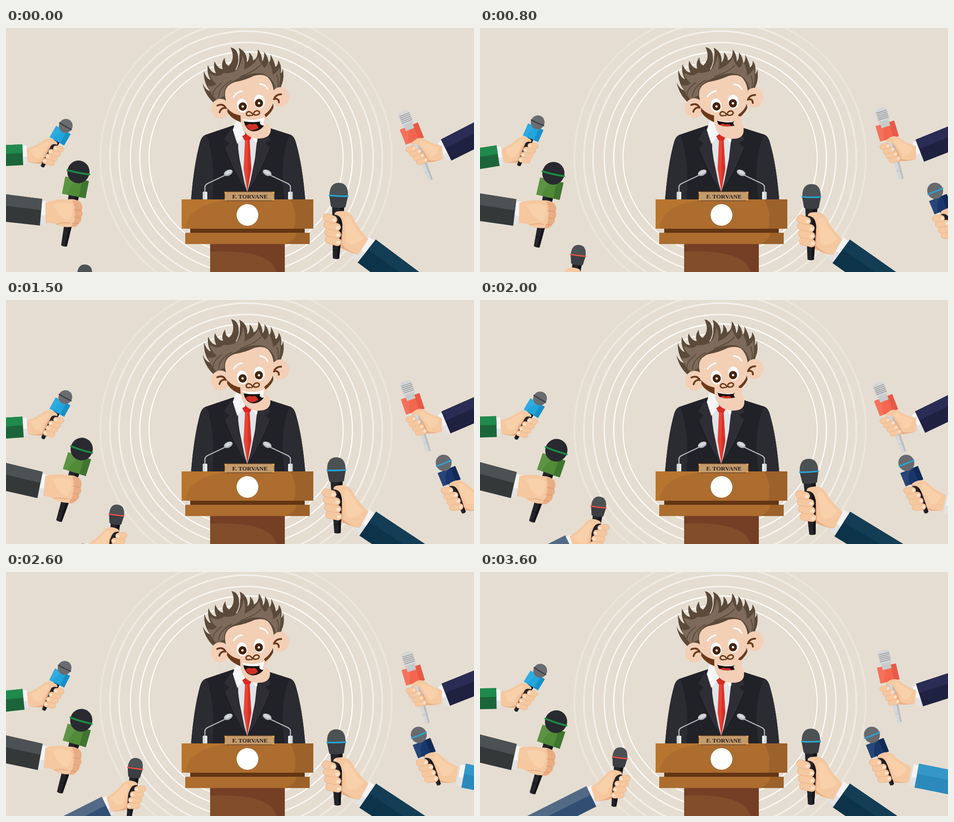
These frames come from a looping animation (1034x541 px, 3.8 s). An HTML page:

```html
<!DOCTYPE html>
<html lang="en">
<head>
<meta charset="utf-8">
<title>Press conference</title>
<style>
  html, body { margin: 0; width: 100%; height: 100%; overflow: hidden; background: #e5ddd1; }
  svg { display: block; width: 100vw; height: 100vh; }
</style>
</head>
<body>
<svg id="stage" viewBox="0 0 1034 541" preserveAspectRatio="none"></svg>
<script>
const path = (d, fill) => `<path d="${d}" fill="${fill}"/>`;
const line = (d, color, w) =>
  `<path d="${d}" fill="none" stroke="${color}" stroke-width="${w}" stroke-linecap="round" stroke-linejoin="round"/>`;
const poly = (pts, fill) => `<polygon points="${pts.join(' ')}" fill="${fill}"/>`;
const rect = (x, y, w, h, fill, r = 0) =>
  `<rect x="${x}" y="${y}" width="${w}" height="${h}" rx="${r}" fill="${fill}"/>`;
const oval = (x, y, rx, ry, fill) => `<ellipse cx="${x}" cy="${y}" rx="${rx}" ry="${ry}" fill="${fill}"/>`;
const group = (id, body) => `<g id="${id}">${body}</g>`;
const placed = (t, body) => `<g transform="${t}">${body}</g>`;

const SKIN = '#f5c8a0', SHADE = '#e9ad84', GLOW = '#f8d0aa';
const FACE = '#f3cfb6', BROWN = '#6b3a1a', DARK_HAIR = '#5b4a3a', HAIR = '#7d6a5a';

// ---------- backdrop ----------
function rings() {
  const spec = [[214.5, 2.2, 1], [235, 2.6, .95], [256, 3, .75], [281, 3.4, .6], [301, 3.8, .38], [322, 4.2, .22]];
  return spec.map(([r, w, o]) =>
    `<circle cx="530.5" cy="288" r="${r}" fill="none" stroke="#fff" stroke-width="${w}" opacity="${o}"/>`).join('');
}

// ---------- speaker ----------
function suit() {
  return path('M409 380 Q415 305 428 256 Q432 239 443 236 L502 216 L574 219 L627 236 Q637 239 641 256 Q655 305 661 380Z', '#212227')
    + path('M409 380 Q415 305 428 256 Q432 239 443 236 Q464 300 456 380Z', '#2b2b32')
    + path('M661 380 Q655 305 641 256 Q637 239 627 236 Q602 300 616 380Z', '#2b2b32')
    + poly([[512, 236], [556, 236], [554, 290], [533, 364], [514, 300]], '#e3e4e7')
    + path('M497 222 L482 248 L494 255 L483 266 Q500 315 531 364 L516 290 L511 254Z', '#2f2e35')
    + path('M571 222 L585 248 L572 255 L584 266 Q566 315 535 364 L550 290 L554 254Z', '#2f2e35')
    + line('M483 266 Q500 315 531 364 M584 266 Q566 315 535 364', '#19191d', 1.5)
    + poly([[508, 205], [501, 226], [511, 257], [529, 236], [520, 210]], '#f7f7f7')
    + poly([[538, 236], [553, 255], [558, 236]], '#f7f7f7')
    + poly([[528, 247], [538, 247], [542, 312], [533, 363], [525, 312]], '#e84436')
    + poly([[535, 247], [538, 247], [542, 312], [533, 363]], '#d4342c')
    + poly([[522, 240], [532, 233], [544, 239], [539, 249], [527, 249]], '#d92a22');
}

function hair() {
  return path('M466 172 Q440 152 434 122 Q441 138 451 140 Q436 122 437 95 Q443 113 452 115 '
      + 'Q443 100 446 82 Q453 100 464 100 Q457 86 461 74 Q468 91 479 91 Q474 79 483 66 '
      + 'Q484 81 492 84 Q508 68 496 43 Q514 46 513 70 Q519 58 514 44 Q534 54 532 76 '
      + 'Q539 70 537 54 Q546 62 546 72 Q558 66 556 47 Q566 58 566 74 Q572 66 570 53 '
      + 'Q580 64 580 78 Q586 72 584 58 Q594 76 595 86 Q602 82 601 71 Q610 82 607 100 '
      + 'Q612 97 611 87 Q616 110 609 126 Q605 142 595 153 L580 112 L490 160Z', DARK_HAIR)
    + path('M468 163 Q449 142 446 128 Q456 132 465 124 Q451 112 450 101 Q468 112 480 100 '
      + 'Q500 102 511 92 Q522 76 522 60 Q531 78 525 92 Q548 84 557 64 Q562 80 571 88 '
      + 'Q578 84 579 72 Q590 92 589 104 Q600 98 604 88 Q610 118 597 147 Q595 116 575 105 '
      + 'Q545 95 505 117 Q486 128 484 152 Q476 150 468 163Z', HAIR)
    + line('M470 154 Q468 134 498 116 M458 148 Q456 138 476 122 M600 134 Q604 118 598 104 M517 108 Q550 96 562 82', DARK_HAIR, 2)
    + line('M484 152 Q481 128 505 118 Q545 96 570 104 Q590 112 593 146', DARK_HAIR, 3.5)
    + line('M513 55 Q518 74 508 92', '#e5ddd1', 1.8);
}

function eye(x, y, px, py) {
  return `<ellipse cx="${x}" cy="${y}" rx="11.8" ry="15.5" fill="#fff" transform="rotate(-8 ${x} ${y})"/>`
    + oval(px, py, 9, 9.3, '#43230f') + oval(px, py, 2.6, 2.6, '#fff');
}

function jaw() {
  const open = path('M519 203 Q521 240 552 245 Q584 247 585 226 Q585 212 573 211 L570 200Z', FACE)
    + path('M525 204 Q548 211 571 202 Q560 206 562 213 Q566 218 571 215 Q562 229 546 229 Q529 227 525 204Z', '#17120f')
    + path('M530 218 Q536 210 545 214 Q553 209 558 221 Q548 229 539 226Z', '#d23027')
    + path('M523 201 Q547 208 570 198 Q573 202 569 206 Q548 211 526 207Z', '#fff')
    + path('M571 204 Q558 206 562 213 Q566 218 573 215 Q566 211 571 204Z', '#fff');
  const shut = path('M518 196 Q517 238 550 245 Q583 248 584 228 Q585 214 577 209 Q582 203 577 195Z', FACE)
    + path('M524 204 Q544 211 563 206 Q558 211 564 216 Q543 221 528 214Z', '#17120f')
    + path('M531 215 Q537 210 544 214 Q552 211 556 217 Q543 220 531 215Z', '#d23027')
    + line('M525 205 Q544 210 560 207', '#fff', 1.5);
  return group('open', open) + group('shut', shut);
}

function head() {
  return hair()
    + oval(474, 179, 21, 22, FACE) + oval(606, 153, 20, 22, FACE)
    + path('M484 150 Q482 128 505 120 Q528 116 548 106 Q566 101 577 108 Q592 122 592 150 '
      + 'Q590 172 577 186 Q570 193 577 197 Q580 201 574 206 L520 210 Q516 198 500 192 Q488 178 484 150Z', FACE)
    + path('M489 178 Q500 191 518 194 L519 209 Q497 201 489 186Z', BROWN)
    + path('M590 167 Q585 182 571 192 L574 198 Q588 186 591 176Z', BROWN)
    + line('M467 172 Q480 166 486 178 M472 187 Q474 178 483 177', BROWN, 4)
    + line('M592 158 Q596 147 608 147 M594 157 Q603 156 603 165', BROWN, 4)
    + line('M503 153 Q508 143 521 140 M561 124 Q573 125 578 135', '#fff', 3.4)
    + eye(522, 172, 523, 174) + eye(560, 163, 559, 166.5)
    + jaw()
    + line('M540 194 Q531 196 531 190 Q534 183 541 187 Q548 192 543 194 M549 193 Q561 194 560 186 Q555 181 549 186 Q545 192 549 192', BROWN, 3);
}

// ---------- lectern ----------
function stand() {
  return line('M439.5 364 V352 Q440 348 445 345 L485 326', '#babdc1', 2.4)
    + `<ellipse cx="491" cy="321" rx="10.5" ry="6.3" fill="#aeb1b5" transform="rotate(-26 491 321)"/>`
    + `<ellipse cx="491" cy="320" rx="8" ry="3.8" fill="#d5d7d9" transform="rotate(-26 491 320)"/>`
    + rect(434.5, 363, 10, 17, '#d3d5d8', 1.5) + rect(440, 363, 4.5, 17, '#eceded', 1.5);
}

function lectern() {
  const studs = [[485, 365], [591, 365], [485, 381], [591, 381]];
  return rect(451, 479, 165, 62, '#743f25')
    + path('M451 496 Q585 490 597 541 H451Z', '#824d2b')
    + rect(407, 445, 253, 9, '#633613')
    + rect(396, 454, 275, 25, '#ac6d2f') + path('M671 454 H642 Q640 470 618 479 H671Z', '#9d612a')
    + rect(388, 380, 291, 65, '#ac6d2f')
    + path('M388 380 H500 Q400 390 397 445 H388Z', '#b8752f')
    + path('M679 380 H628 Q646 412 636 445 H679Z', '#9d612a')
    + oval(533.5, 414.5, 24, 24, '#fff')
    + stand() + placed('matrix(-1 0 0 1 1068 0)', stand())
    + `<rect x="483" y="363" width="110" height="20" fill="#c59b6c" stroke="#6a4422" stroke-width="1.4"/>`
    + studs.map(([x, y]) => oval(x, y, 2, 2, '#e8b65a')).join('')
    + `<text x="539" y="377.6" text-anchor="middle" font-family="'Liberation Serif', serif" font-weight="bold" font-size="13.5" fill="#231f20">F. TORVANE</text>`;
}

// ---------- reporters ----------
// Corners: upper cuff, lower cuff, lower far end, upper far end.
function sleeve(a, b, c, d, light, dark, cuff) {
  const mix = (p, q, t) => [p[0] + (q[0] - p[0]) * t, p[1] + (q[1] - p[1]) * t];
  const m = mix(a, b, .5), f = mix(c, d, .5);
  const len = Math.hypot(m[0] - f[0], m[1] - f[1]);
  const out = p => [p[0] + (m[0] - f[0]) / len * cuff, p[1] + (m[1] - f[1]) / len * cuff];
  const p = mix(a, b, .07), q = mix(a, b, .93);
  return poly([p, q, out(q), out(p)], '#f4f4f5')
    + poly([mix(a, b, .6), q, out(q), out(mix(a, b, .6))], '#e2e3e6')
    + poly([a, b, c, d], dark)
    + poly([a, mix(a, b, .42), mix(d, c, .42), d], light);
}

// Upright microphone, head centred on (x, y), leaning by angle.
function mic(x, y, angle, o) {
  const { r, len, w, color, body = '#24242a', edge = '#15151a', band, block } = o;
  const end = w * .5;
  let s = path(`M${-w} ${r * .7} H${w} L${end} ${len} Q0 ${len + 3} ${-end} ${len}Z`, body)
    + path(`M${w * .3} ${r * .7} H${w} L${end} ${len} H${end * .3}Z`, edge)
    + line(`M${-end * 1.1} ${len * .87} H${end * 1.1}`, edge, 1.2);
  if (block) {
    const [at, bw, bh, c1, c2] = block;
    s += rect(-bw / 2, at - bh / 2, bw, bh, c1) + rect(bw * .22, at - bh / 2, bw * .28, bh, c2)
      + path(`M${-bw / 2} ${at + bh / 2} V${at - bh / 2} H${bw * .1} Q${-bw * .2} ${at - bh * .2} ${-bw * .3} ${at + bh / 2}Z`, 'rgba(255,255,255,.07)');
  }
  if (o.shape === 'egg') {
    s += path(`M${-r} 0 Q${-r} ${-r * 1.35} 0 ${-r * 1.35} Q${r} ${-r * 1.35} ${r} 0 L${r * .78} ${r * 1.25} Q0 ${r * 1.45} ${-r * .78} ${r * 1.25}Z`, color)
      + path(`M${-r} 2 H${r} L${r * .78} ${r * 1.25} Q0 ${r * 1.45} ${-r * .78} ${r * 1.25}Z`, '#3b3f43');
  } else if (o.shape === 'tube') {
    s += path(`M-13 18 V-8 Q-12 -15 0 -15 Q12 -15 13 -8 V18Z`, color)
      + [-6, -2, 2, 6, 10].map(v => line(`M-11 ${v} H12`, '#8d8f92', 1.4)).join('')
      + rect(-10, 15, 20, 14, '#c9cacb');
  } else {
    s += oval(0, 0, r, r * 1.03, color);
    if (o.mesh) s += oval(0, 0, r, r * 1.03, 'url(#mesh)');
  }
  if (band) s += line(`M${-r} 1 Q0 ${r * .12} ${r} 1`, band, Math.max(2.4, r * .17));
  return placed(`translate(${x} ${y}) rotate(${angle})`, s);
}

// A grip seen from the palm side, arm to the right, microphone passing through the origin.
const palm = path('M67 28 Q42 2 30 -24 Q18 -37 0 -32 Q-22 -20 -24 10 Q-20 35 8 48 Q30 60 46 62Z', SHADE);
function fingers() {
  let s = path('M67 28 Q45 5 34 -20 Q25 -36 6 -34 Q-8 -34 -7 -26 Q6 -25 9 -12 Q14 10 9 40 Q22 56 46 62Z', SKIN)
    + path('M56 26 Q38 4 28 -18 Q18 -30 14 -12 Q20 16 18 34 Q34 48 56 26Z', GLOW);
  for (let i = 3; i >= 0; i--) {
    const y = -20 + i * 16.5, x0 = -24 + i * 1.6, x1 = -3 + (i === 0 ? -7 : i * .8);
    const d = `M${x0} ${y} L${x1} ${y + 5}`;
    s += line(d, SHADE, 18) + line(d, SKIN, 16)
      + `<ellipse cx="${x1 + 2}" cy="${y + 6}" rx="4.6" ry="3.6" fill="#fbe3cd"/>`;
  }
  return s;
}
const grip = (t, device) => placed(t, palm) + device + placed(t, fingers());

function fist() {
  return path('M87 387 Q112 378 134 380 Q158 377 166 389 Q171 398 167 404 Q172 412 166 420 Q168 428 161 433 Q156 443 144 441 Q124 443 110 435 Q99 430 87 433Z', SKIN)
    + path('M146 382 Q162 380 166 389 Q171 398 167 404 Q172 412 166 420 Q168 428 161 433 Q156 443 144 441 Q154 428 152 412 Q154 396 146 382Z', SHADE)
    + path('M104 392 Q128 382 146 392 Q150 412 140 426 Q118 424 104 392Z', GLOW)
    + line('M150 403 L166 404 M151 419 L165 420 M147 433 L160 433', '#d9976e', 1.3)
    + line('M112 435 Q128 430 142 433', SHADE, 2);
}

const crew = {
  a: sleeve([36, 258], [38, 304], [-60, 309], [-60, 262], '#1f8a4c', '#1c653a', 9)
    + grip('translate(99 273) rotate(29) scale(-.73 .73)',
      mic(132, 217, 30, { r: 15, len: 104, w: 8, color: '#77797d', mesh: 1, band: '#3b3c42',
        block: [25, 37, 29, '#20a5dd', '#1a8fc6'] })),
  b: sleeve([80, 379], [75, 438], [-60, 423], [-60, 361], '#4c5153', '#343839', 12)
    + mic(160, 319, 11, { r: 24.5, len: 167, w: 13, color: '#282a2f', band: '#1f8a45',
        block: [35, 53, 39, '#518b37', '#3f7530'] })
    + fist(),
  e: sleeve([961, 247], [984, 294], [1100, 236], [1100, 175], '#2a2c55', '#1f2140', 9)
    + grip('translate(912 272) rotate(-34) scale(.72)',
      mic(882, 198, -22, { shape: 'tube', r: 13, len: 150, w: 10, color: '#d5d6d7', body: '#d6d7d8', edge: '#bcbdbf',
        block: [39, 43, 36, '#f4664f', '#e85a47'] })),
  f: sleeve([970, 425], [960, 478], [1100, 506], [1100, 451], '#3398c8', '#2b8abb', 11)
    + grip('translate(892 431) rotate(-21) scale(.84)',
      mic(866, 361, -22, { r: 17.5, len: 119, w: 9, color: '#73767a', mesh: 1, band: '#2ba5d6',
        block: [32, 42, 32, '#19376d', '#132a56'] })),
  c: sleeve([235, 475], [257, 520], [77, 611], [55, 566], '#526a86', '#304f72', 11)
    + grip('translate(303 468) rotate(14) scale(-.8 .8)',
      mic(309, 411, 7, { shape: 'egg', r: 16.5, len: 109, w: 11, color: '#4c5154', band: '#ee5044' })),
  d: sleeve([817, 469], [777, 520], [858, 581], [966, 581], '#133d55', '#0c334a', 15)
    + grip('translate(733 440)',
      mic(735, 371, 2.4, { shape: 'egg', r: 20.5, len: 140, w: 14, color: '#4c5154', band: '#29a6d5' }))
};

document.getElementById('stage').innerHTML =
  `<defs><pattern id="mesh" width="4" height="4" patternUnits="userSpaceOnUse">
    <path d="M0 0L4 4M4 0L0 4" stroke="#56585d" stroke-width=".8"/></pattern></defs>`
  + rect(0, 0, 1034, 541, '#e5ddd1') + rings()
  + suit() + group('head', head()) + lectern()
  + Object.keys(crew).map(id => group(id, crew[id])).join('');

// ---------- motion ----------
const LOOP = 3800;
const starts = [0, 200, 400, 600, 800, 1100, 1300, 1500, 1700, 2000, 2200, 2400, 2600, 2800, 3000, 3200, 3400, 3600];
const mouth = 'oooossoosssoooosss';

// Each track holds [step, value] pairs.
const turn = (x, y) => v => `rotate(${v} ${x} ${y})`;
const tracks = {
  head: [turn(535, 150), [[0, 0], [2, .8], [5, 1.3], [9, 0], [12, 1.2], [14, 1.2], [17, .5]]],
  a: [turn(58, 255), [[0, 0], [2, -4], [4, -6.2], [5, -6], [8, 1], [9, 1], [12, -3.5], [13, -4.8], [14, -4.2], [17, 1.5]]],
  b: [turn(62, 389), [[0, 0], [2, -1.8], [5, 3.6], [8, 7.9], [9, 7.9], [11, 5.8], [12, 5.5], [14, 8.6], [15, 8.6], [17, 7.2]]],
  c: [v => `translate(${-v} ${v})`, [[0, 135.5], [2, 111.5], [5, 82.5], [9, 47], [12, 23.5], [14, 0], [17, 0]]],
  d: [turn(822, 459), [[0, 0], [2, -2.5], [5, -1.3], [9, -5.5], [12, -3.5], [14, -6.5], [15, -6.5], [16, -2.5], [17, -2.5]]],
  e: [turn(957, 263), [[0, 0], [2, 3.6], [5, 6.2], [9, 1], [12, 5.4], [14, 6.8], [17, 9]]],
  f: [v => `translate(${v} 0)`, [[0, 200], [2, 167], [5, 126], [9, 76], [12, 46], [14, 29], [17, 0]]]
};

function valueAt(keys, k) {
  const i = Math.max(1, keys.findIndex(p => p[0] >= k));
  const [k0, v0] = keys[i - 1], [k1, v1] = keys[i];
  return v0 + (v1 - v0) * (k - k0) / (k1 - k0);
}

const node = id => document.getElementById(id);
let shown = -1;

function pose(k) {
  for (const id in tracks) {
    const [move, keys] = tracks[id];
    node(id).setAttribute('transform', move(valueAt(keys, k)));
  }
  node('open').style.display = mouth[k] === 'o' ? '' : 'none';
  node('shut').style.display = mouth[k] === 's' ? '' : 'none';
  shown = k;
}

const begin = performance.now();
function tick() {
  const t = Math.max(0, performance.now() - begin) % LOOP;
  const k = starts.filter(s => s <= t).length - 1;
  if (k !== shown) pose(k);
  requestAnimationFrame(tick);
}
tick();
</script>
</body>
</html>
```
